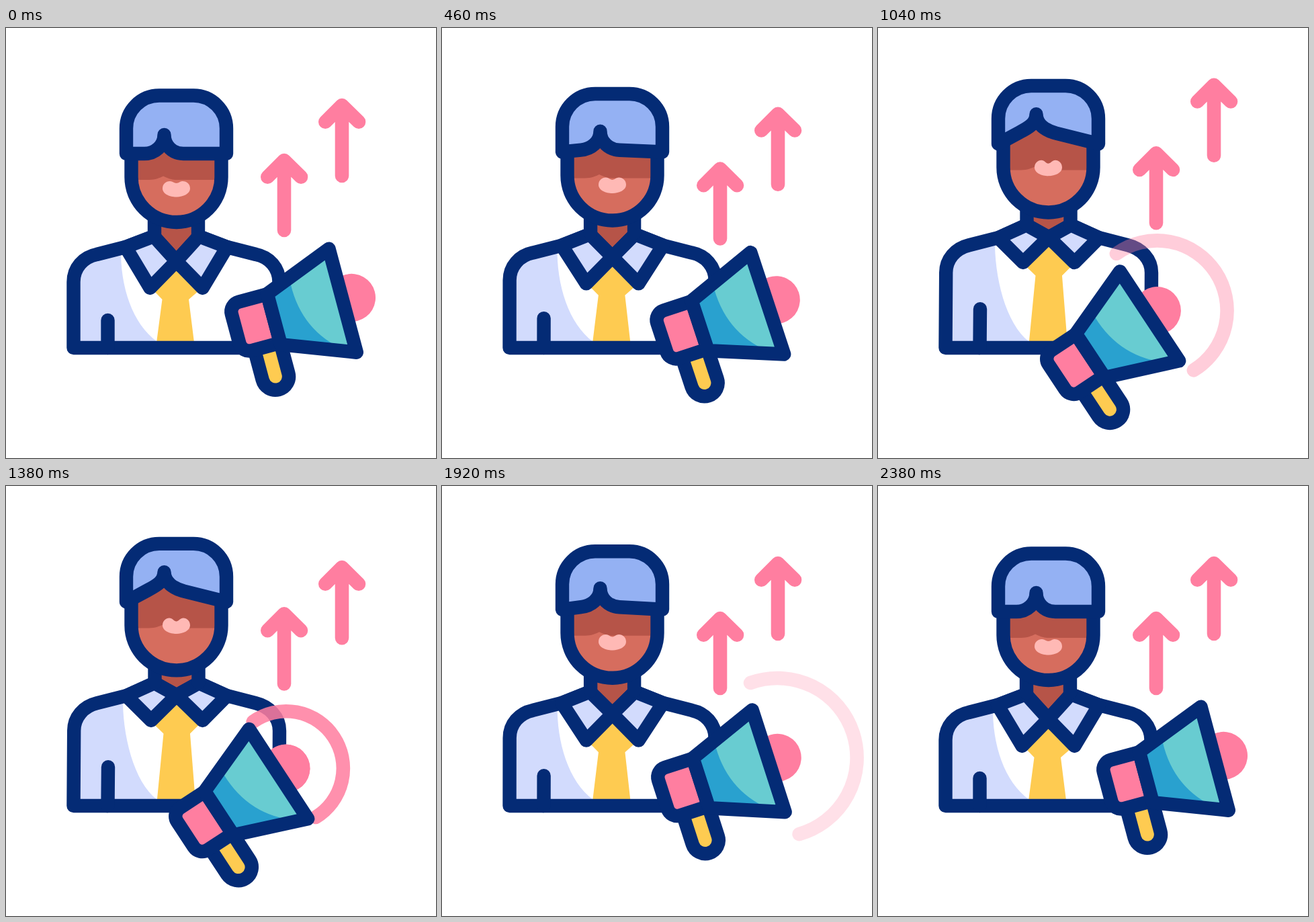
Write an HTML page that moves like this. It is 640 by 640 pixels and loops after 2.4 s.

```html
<!DOCTYPE html>
<html>
<head>
<meta charset="utf-8">
<title>Announcement</title>
<style>
  html, body { margin: 0; height: 100%; overflow: hidden; background: #fff; }
  svg { display: block; width: 100%; height: 100%; }
  path { fill: none; }
  .line { stroke: #042b75; stroke-width: 20.4; stroke-linecap: round; stroke-linejoin: round; }
  .pink { stroke: #ff7ea0; stroke-width: 20.6; stroke-linecap: round; stroke-linejoin: round; }
</style>
</head>
<body>
<svg viewBox="0 0 640 640">
  <!-- data-to holds the raised pose of a path -->
  <g id="body">
    <path style="fill:#b65448" d="M221 250 L286 250 L287 310 L253.5 347 L220 310 Z" data-to="M221 250 L286 250 L287 293 L254 311 L221 293 Z"/>
    <path style="fill:#fff" d="M100.5 476 L100.5 378 C100.5 357 115 341 135 337 L178 326 L220 310 L253.5 347 L287 310 L329 326 L372 337 C392 341 406.5 357 406.5 378 L406.5 476 Z"
      data-to="M100.5 476 L101.2 364 C101.2 344 115 328 135.5 323 L179 312 L221 293 L254 311 L287 293 L329 312 L371.5 323 C392 328 407 344 407 364 L406.5 476 Z"/>
    <path style="fill:#d2dbfd" d="M100.5 476 L100.5 378 C100.5 357 115 341 135 337 L171 328 C170 385 188 440 225 467 L225 476 Z"
      data-to="M100.5 476 L101.2 364 C101.2 344 115 328 135.5 323 L174 313 C173 370 190 440 225 467 L225 476 Z"/>
    <path style="fill:#fecb51" d="M253.5 350 L220 391 L232.5 404 L223 476 L281 476 L272 404 L287 391 Z"
      data-to="M254 314 L220 354 L234.5 368 L224 476 L282.5 476 L274 368 L288 354 Z"/>
    <path class="line" d="M100.5 476 L100.5 378 C100.5 357 115 341 135 337 L178 326 L220 310 L253.5 347 L287 310 L329 326 L372 337 C392 341 406.5 357 406.5 378 L406.5 476 Z"
      data-to="M100.5 476 L101.2 364 C101.2 344 115 328 135.5 323 L179 312 L221 293 L254 311 L287 293 L329 312 L371.5 323 C392 328 407 344 407 364 L406.5 476 Z"/>
    <path class="line" style="fill:#d2dbfd" d="M178 326 L220 310 L253.5 347 L214.5 387 Z M329 326 L287 310 L253.5 347 L292.5 387 Z"
      data-to="M179 312 L221 293 L254 311 L216 348.5 Z M329 312 L287 293 L254 311 L292.5 348.5 Z"/>
    <path class="line" d="M151.5 435 L151.5 476" data-to="M152 418 L151.5 476"/>
    <path class="line" d="M221 260 L221 308 M286 260 L286 308" data-to="M221.5 260 L221.5 292 M286.5 260 L286.5 292"/>
  </g>
  <g id="head">
    <path style="fill:#d66d5e" d="M186.5 160 V222 A67 67 0 0 0 320.5 222 V160 Z"/>
    <path style="fill:#b65448" d="M187 160 H320 V226 H252 C246 226 240 223 234 220.5 C229 223 222 226 213 226 H187 Z"/>
    <path class="line" d="M186.5 187 V222 A67 67 0 0 0 320.5 222 V187"/>
    <path style="fill:#ffb9b5" d="M233 239 C233 232 238 228 244 228 C248 228 250 231 253.5 231 C257 231 259 228 263 228 C269 228 274 232 274 239 C274 247 263 251.5 253.5 251.5 C244 251.5 233 247 233 239 Z"
      data-to="M233 222 C233 215 238 211 243 211 C248 211 250 216 253.5 216 C257 216 259 211 264 211 C269 211 274 215 274 222 C274 230 263 234.5 253.5 234.5 C244 234.5 233 230 233 222 Z"/>
    <path class="line" style="fill:#94b1f3" d="M179 187 V149.5 A49 49 0 0 1 228 100.5 H279 A49 49 0 0 1 328 149.5 V187 L264 187 C248 187 235.5 175 235.5 159 C235.5 175 222 187 206 187 Z"
      data-to="M179 187 V149.5 A49 49 0 0 1 228 100.5 H279 A49 49 0 0 1 328 149.5 V187 L265 171 C250 167 235.5 158 235.5 142.5 C235.5 157 223 163 210 170 Z"/>
  </g>
  <path class="pink arrow" d="M414 301 V197 M389.3 221.7 L414 197 L439 221.7"/>
  <path class="pink arrow" d="M500 220 V115 M475.3 139.7 L500 115 L525 139.7"/>
  <g id="horn">
    <path class="pink ring"/>
    <path class="pink ring"/>
    <path class="pink ring"/>
    <circle cx="14" r="35.5" fill="#ff7ea0"/>
    <path class="line" style="fill:#fecb51" d="M-146 37.5 V84 a20 20 0 0 0 40 0 V37.5"/>
    <path class="line" style="fill:#ff7ea0" d="M-106 -37.5 H-150 a15 15 0 0 0 -15 15 V22.5 a15 15 0 0 0 15 15 H-106 Z"/>
    <path style="fill:#68ccd1" d="M-106 -38 L0 -79 V80.5 L-106 40 Z"/>
    <path style="fill:#29a1cf" d="M-106 -38 L-68 -52 Q-74 22 -22 68 L-106 40 Z"/>
    <path class="line" d="M-106 -38 L0 -79 V80.5 L-106 40 Z"/>
  </g>
</svg>
<script>
const LOOP = 2400;
const $$ = selector => [...document.querySelectorAll(selector)];
const head = document.getElementById('head');
const horn = document.getElementById('horn');
const arrows = $$('.arrow'), rings = $$('.ring');
const NUMBER = /-?[\d.]+/g;
const morphs = $$('[data-to]').map(path => ({
  path, from: path.getAttribute('d'), to: path.dataset.to.match(NUMBER)
}));

const clamp = x => Math.min(1, Math.max(0, x));
const smooth = x => x * x * (3 - 2 * x);

// cubic-bezier(.75, 0, .25, 1)
function ease(x) {
  let lo = 0, hi = 1;
  for (let i = 0; i < 24; i++) {
    const s = (lo + hi) / 2;
    if (2.25 * s - 3.75 * s * s + 2.5 * s ** 3 < x) lo = s; else hi = s;
  }
  return smooth(lo);
}

// There and back: leaves at start, turns at peak, returns by end.
const swing = (t, start, peak, end) => t < peak
  ? ease(clamp((t - start) / (peak - start)))
  : 1 - ease(clamp((t - peak) / (end - peak)));

// Vertical offsets as [time, value]
const hops = [
  [[0, 0], [440, 13], [800, -36], [1265, 12], [1520, -31], [1770, 0], [LOOP, 0]],
  [[0, 0], [565, 14], [960, -36], [1330, 11], [1570, -31], [1880, 0], [LOOP, 0]]
];
function track(keys, t) {
  const i = keys.findIndex(key => key[0] > t);
  const [t0, v0] = keys[i - 1], [t1, v1] = keys[i];
  return v0 + (v1 - v0) * smooth((t - t0) / (t1 - t0));
}

// Sound waves as [start, duration, reach]
const waves = [[611, 500, 90], [1120, 420, 90], [1380, 580, 99]];
function drawWave(ring, [start, duration, reach], t) {
  const k = (t - start) / duration;
  const active = k > 0 && k < 1;
  ring.setAttribute('opacity', active ? clamp(2.08 - 1.97 * k) : 0);
  if (!active) return;
  const r = 25 + reach * k ** .85, spread = 92 * Math.PI / 180;
  const x = 14 + r * Math.cos(spread), y = r * Math.sin(spread);
  ring.setAttribute('d', `M${x} ${-y} A${r} ${r} 0 1 1 ${x} ${y}`);
}

function draw(now) {
  const t = now % LOOP;
  const p = swing(t, 0, 1220, 2400), q = swing(t, 25, 1175, 2350);
  for (const { path, from, to } of morphs) {
    let i = 0;
    path.setAttribute('d', from.replace(NUMBER, v => +v + (to[i++] - v) * p));
  }
  head.setAttribute('transform', `translate(0 ${-14.8 * p})`);
  horn.setAttribute('transform',
    `translate(${501 - 98.2 * q} ${405 + 23.5 * q}) rotate(${-15 - 18.7 * q})`);
  arrows.forEach((arrow, i) => arrow.setAttribute('transform', `translate(0 ${track(hops[i], t)})`));
  rings.forEach((ring, i) => drawWave(ring, waves[i], t));
}

function tick() {
  draw(performance.now());
  requestAnimationFrame(tick);
}
tick();
</script>
</body>
</html>
```
